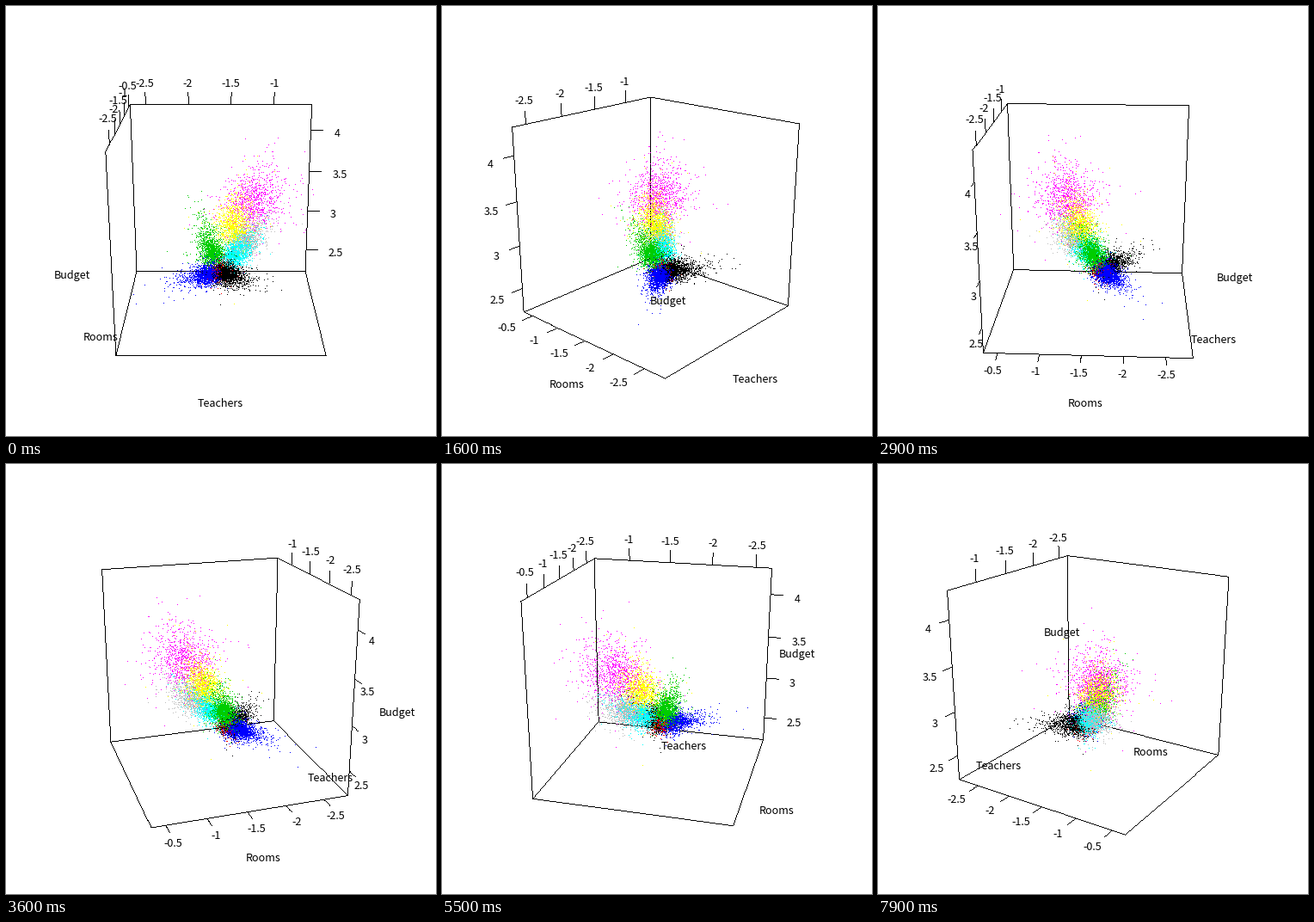
These frames come from a looping animation (500 by 500 pixels, 8000 ms). A matplotlib script:

```python
from itertools import product

import numpy as np
import matplotlib.pyplot as plt
from matplotlib.animation import FuncAnimation

SIZE, FRAMES, STEP = 500, 80, 3          # pixels, frames, degrees per frame
EYE = 8.235                              # eye distance in half box lengths
SCALE = SIZE / 2 / np.tan(np.radians(15))
TILT = np.radians(20)
TICK = 2 / 15
PAD = 1.3                                # titles sit this far from the centre
FONT = dict(family=["Noto Sans CJK JP", "DejaVu Sans"], size=12.6 * 0.72,
            ha="center", va="baseline", color="black")

# title, its place, first and last tick, centre, half range
AXES = [
    ("Teachers", (0, -PAD, -PAD), -2.5, -1, -1.62, 1.06),
    ("Rooms", (-PAD, 0, -PAD), -2.5, -0.5, -1.573, 1.246),
    ("Budget", (-PAD, -PAD, 0), 2.5, 4, 3.2575, 1.0417),
]

CORE = np.array([-.02, -.08, -.53])      # densest spot of the cloud
GROUPS = {                               # colour: size, centre
    (0, 0, 0): (2300, (.06, -.17, -.52)),
    (255, 0, 0): (450, CORE),
    (0, 205, 0): (1500, (-.1, 0, -.31)),
    (0, 0, 255): (1700, (-.16, -.17, -.53)),
    (0, 255, 255): (1500, (.17, .08, -.38)),
    (255, 0, 255): (900, (.36, .29, .14)),
    (255, 255, 0): (1100, (.13, .15, -.08)),
    (190, 190, 190): (900, (.29, .23, -.28)),
}


def make_cloud():
    """Groups widen, and trail outward, with distance from the core."""
    rng = np.random.default_rng(7)
    pts, cols = [], []
    for color, (n, centre) in GROUPS.items():
        away = np.array(centre) - CORE
        dist = np.linalg.norm(away)
        outward = away / max(dist, .1)
        noise = rng.standard_t(7, (n, 3)) * (.045 + .12 * dist ** 2)
        trail = (rng.exponential(size=(n, 1)) - 1) * .1 * outward
        pts.append(centre + noise + trail)
        cols.append(np.tile(color, (n, 1)))
    return np.clip(np.vstack(pts), -.97, .97), np.vstack(cols).astype(np.uint8)


def turn(p, angle):
    """Rotate about the height axis, then tilt: right, up, near."""
    x, y, z = np.asarray(p, float).T
    right = x * np.cos(angle) - y * np.sin(angle)
    back = x * np.sin(angle) + y * np.cos(angle)
    up = back * np.sin(TILT) + z * np.cos(TILT)
    near = z * np.sin(TILT) - back * np.cos(TILT)
    return right, up, near


def project(p, angle):
    """Screen x, screen y and depth towards the eye."""
    right, up, near = turn(p, angle)
    k = SCALE / (EYE - near)
    return SIZE / 2 + right * k, SIZE / 2 - up * k, near


def box_edges(rear):
    """Edges touching the floor or a rear wall."""
    for axis, signs in product(range(3), product((-1, 1), repeat=2)):
        if np.any(np.array(signs) == np.delete(rear, axis)):
            yield [np.insert(signs, axis, end) for end in (-1, 1)]


def axis_layout(xb, yb, angle):
    """For x, y, z: a point on the labelled edge and the tick direction."""
    up, out = np.array([0, 0, 1]), np.array([-xb, 0, 0])
    top_nearer = abs(np.sin(angle)) < np.tan(TILT)
    y_axis = ((xb, 0, 1), up) if top_nearer else ((-xb, 0, -1), out)
    return [((0, yb, 1), up), y_axis, ((-xb, yb, 0), out)]


def lean(direction, angle):
    """Sideways label shift, in label widths, for flat ticks."""
    right, up, _ = turn(direction, angle)
    slope = np.arctan2(abs(up), abs(right))
    return np.sign(right) * max(0, .5 - slope / (np.pi / 2))


def draw_line(img, ends, angle):
    x, y, _ = project(ends, angle)
    n = int(max(abs(np.diff(x)[0]), abs(np.diff(y)[0]))) + 2
    rows, cols = np.linspace(y[0], y[1], n), np.linspace(x[0], x[1], n)
    img[rows.astype(int), cols.astype(int)] = 0


cloud, colors = make_cloud()
fig = plt.figure(figsize=(SIZE / 100, SIZE / 100), dpi=100, facecolor="white")
ax = fig.add_axes([0, 0, 1, 1])
ax.axis("off")
canvas = ax.imshow(np.full((SIZE, SIZE, 3), 255, np.uint8),
                   extent=(0, SIZE, SIZE, 0), interpolation="nearest",
                   aspect="auto")


def new_text(s):
    return ax.text(0, 0, s, **FONT)


def place(text, x, y):
    text.set_position((x - .5, y + 7.5))


renderer = fig.canvas.get_renderer()
titles = [new_text(a[0]) for a in AXES]
ticks = [np.arange(first, last + .1, .5) for _, _, first, last, _, _ in AXES]
labels = [[new_text(f"{v:g}") for v in vals] for vals in ticks]
widths = [[t.get_window_extent(renderer).width for t in row] for row in labels]


def update(i):
    angle = np.radians(i * STEP) - 1e-6
    xb = 1 if np.sin(angle) > 0 else -1
    yb = 1 if np.cos(angle) > 0 else -1
    img = np.full((SIZE, SIZE, 3), 255, np.uint8)

    for edge in box_edges((xb, yb, -1)):
        draw_line(img, edge, angle)

    for k, (edge, direction) in enumerate(axis_layout(xb, yb, angle)):
        title, spot, _, _, mid, half = AXES[k]
        shift = lean(direction, angle)
        for v, text, width in zip(ticks[k], labels[k], widths[k]):
            base = np.array(edge, float)
            base[k] = (v - mid) / half
            draw_line(img, [base, base + TICK * direction], angle)
            x, y, _ = project(base + 2 * TICK * direction, angle)
            place(text, x + shift * width, y)
        x, y, _ = project(spot, angle)
        place(titles[k], x, y)

    x, y, near = project(cloud, angle)
    order = np.argsort(near)
    img[y[order].astype(int), x[order].astype(int)] = colors[order]
    canvas.set_data(img)
    return []


anim = FuncAnimation(fig, update, frames=FRAMES, interval=100,
                     repeat=True, repeat_delay=0)
plt.show()
```
